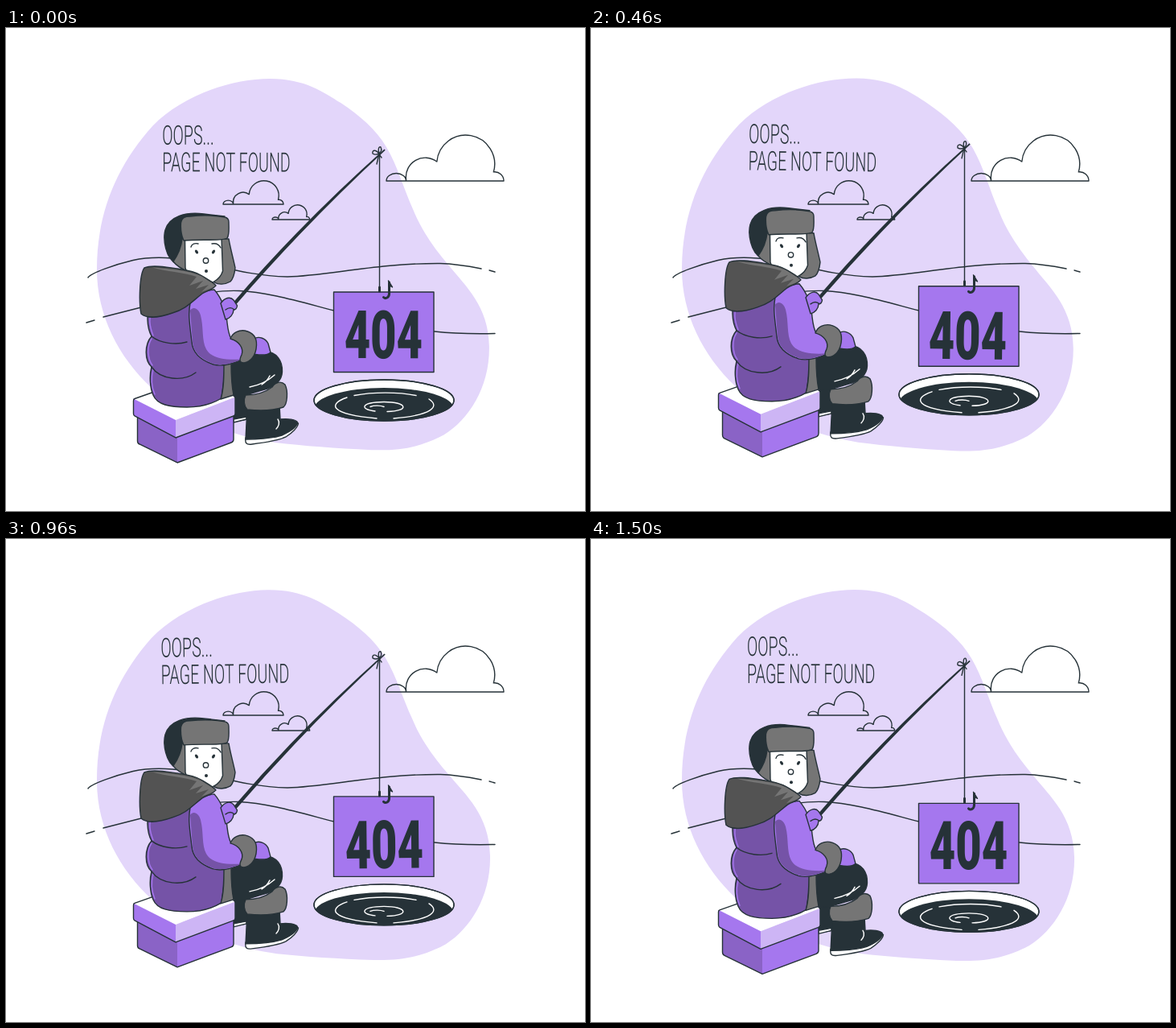
Write an HTML page that moves like this. It is 720 px wide and 600 px high and loops after 1540 ms.

```html
<!DOCTYPE html>
<html lang="en">
<head>
<meta charset="utf-8">
<title>Page not found</title>
<style>
  html, body { margin: 0; width: 100%; height: 100%; overflow: hidden; background: #fff; }
  svg { display: block; width: 720px; height: 600px; }
  svg * { vector-effect: non-scaling-stroke; }
  .line { fill: none; stroke: #263238; stroke-width: 1.4; stroke-linecap: round; stroke-linejoin: round; }
  .white { fill: #fff; }
  .ink { fill: #263238; }
  .lilac { fill: #cdb5f5; }
  .violet { fill: #a577ee; }
  .mid { fill: #8a63c6; }
  .plum { fill: #7553a7; }
  .fur { fill: #757575; }
  .hood { fill: #535353; }
  .plain { stroke: none; }
  .glow { stroke: #fff; }
  .sheen { stroke: #a577ee; }
  .bold { stroke-width: 3; }
  text { font-family: Roboto, "Open Sans", sans-serif; fill: #263238; }
  .title { font-size: 33.3px; font-weight: 300; }
  .code { font-size: 83px; font-weight: 900; text-anchor: middle; }
</style>
</head>
<body>
<svg viewBox="0 0 720 600">
  <defs>
    <path id="cloud" d="M0 0H146C146-7 140-12 133.300-11.100A36 36 0 1 0 62.800-24A24 24 0 0 0 24.500-2V0A12.200 9.500 0 0 0 0 0Z"/>
    <clipPath id="rim"><ellipse cx="470" cy="462.500" rx="87" ry="25.500"/></clipPath>
  </defs>

  <g class="sway">
    <path fill="#e3d6fa" d="M328 63C372 63 395 80 416 93C440 109 460 126 473 148C487 172 494 198 506 225C516 250 532 273 550 294C572 321 600 345 601 395C602 445 576 486 545 505C515 521 490 525 455 524C410 522 370 519 335 515C280 507 215 482 181 447C140 409 113 357 113 300C113 229 138 171 182 122C219 84 280 63 328 63Z"/>
    <g class="title" transform="translate(194 0) scale(.59 1)">
      <text y="145">OOPS...</text>
      <text y="178.500">PAGE NOT FOUND</text>
    </g>
  </g>

  <g class="line">
    <path d="M102 310C106 304 135 294 158 288.500C178 284 205 285 225 288C262 294 300 308 350 309C400 308 460 292 540 292.500C560 293 576 296 591 299M601 301L608 303"/>
    <path d="M100 366L110 363M121 359L172 346C215 335 255 325 290 326.500C325 328 365 340 408 351C450 362 500 374 533 377C560 380 585 380 608 379.500"/>
    <use href="#cloud" transform="translate(473 190)"/>
    <use href="#cloud" transform="translate(270 219) scale(.514)"/>
    <use href="#cloud" transform="translate(331 238) scale(.32)"/>
  </g>

  <g id="scene" class="line">
    <!-- ice hole -->
    <ellipse class="white" cx="470" cy="462.500" rx="87" ry="25.500"/>
    <ellipse class="ink plain" cx="470" cy="473" rx="87" ry="26" clip-path="url(#rim)"/>
    <path class="glow" d="M424 459C400 467 402 480 461 485M433 456.500C456 452 488 452 510 456.500M526 461C540 470 530 481 482 485"/>
    <path class="glow" d="M459 476C440 474 440 465 470 464.500C500 464.500 502 476 474 476.500M453 470.500C458 468.500 466 469 470 470.500"/>
    <ellipse cx="470" cy="462.500" rx="87" ry="25.500"/>

    <!-- far leg -->
    <path class="ink" d="M285 452H300V486L283 489Z"/>
    <path class="white" d="M283 486L299 483V486L283 490Z"/>

    <!-- box: flat faces, then outlines -->
    <g class="plain">
      <path class="mid" d="M163.500 480L213 505V540L166 517Q163.500 516 163.500 513Z"/>
      <path class="violet" d="M213 505L283 478V511Q283 514 280 515L213 540Z"/>
      <path class="white" d="M158.500 461L187 451H270L285 459L211 487Z"/>
      <path class="violet" d="M158.500 460.500L211 487V509L160 482Q158.500 481 158.500 479Z"/>
      <path class="lilac" d="M211 487L285 458.500V479Q285 481 283 482L211 509Z"/>
    </g>
    <path d="M163.500 484V513Q163.500 516 166 517L213 540L280 515Q283 514 283 511V482"/>
    <path d="M187 451L160 460.500Q158.500 461 158.500 463V479Q158.500 481 160 482L211 509L283 482Q285 481 285 479V460Q285 458 283 457"/>

    <!-- near leg -->
    <path class="ink" d="M279 420C290 408 306 402 322 402C337 402 344 414 343.500 427C343 439 334 444 325 448L298 456C292 458 286 456 282 456Z"/>
    <path class="glow" d="M303 446C314 444 325 439 334 431M318 443C323 440 326 436 328 432"/>
    <path class="white" d="M298 509C297 516 299 518 306 517C322 515 340 512 348 508C356 503 363 496 363.500 491Z"/>
    <path class="ink" d="M300 471L340 468L341 486C350 485 361 486 362.500 490C362 496 352 502 343 506C330 510 310 511 298 511Z"/>
    <path class="glow" d="M338 486C341 490 339 495 336 498"/>
    <path class="fur" d="M298 456C295 462 296 470 300 474C317 476 333 475 345 471C350 467 351 451 347 443C342 438 335 440 331 446C322 453 310 456 298 456Z"/>

    <!-- sign and tackle -->
    <path class="violet" d="M407.500 328H532V427.500H407.500Z"/>
    <path d="M464.500 156V322"/>
    <path class="bold" d="M464.500 322V327M469.500 334.500C472 337 476.500 335 476.500 330V316"/>
    <path class="ink" d="M475.500 314L480.500 322L477 320Z"/>
    <path class="ink plain" d="M282.500 341Q367 242.500 470.500 150.500L471.700 151.700Q371 245 286.500 343Z"/>
    <path d="M464 156C459 150 455 152 456 156C459 158 462 157 464 156C462 150 464 147 466 148C468 152 466 154 464 156L461 169M464 157L467 161"/>

    <!-- coat -->
    <path class="plum" d="M180 345C174 352 175 372 181 383C172 393 172 413 181 421C178 432 179 447 183 456C188 468 203 471 225 471C245 471 258 466 268 460L274 415L262 330Z"/>
    <path class="sheen" d="M182 351C177 360 179 372 183 382M181 386C175 395 176 411 182 419M183 424C180 436 182 448 185 455"/>
    <path d="M181 383C192 392 212 394 225 390M181 421C192 437 220 440 236 428"/>
    <path class="fur" d="M271 416H280C280 435 281 446 283 456L267 461C271 448 271 432 271 416Z"/>
    <path class="violet" d="M308 386C315 382 323 386 326 392L329 403C324 408 314 406 308 405Z"/>
    <path class="violet" d="M229 342C233 332 245 326 259 325C270 338 274 352 275 366C276 375 277 381 280 386L294 390V412C280 418 268 421 258 418C240 412 232 402 231 390C229 372 226 356 229 342Z"/>
    <path class="plum plain" d="M229 351C233 345 240 349 242 357C246 372 243 388 249 399C255 410 272 413 293 411.500C280 417 268 420 258 417C241 411 233 402 232 390Z"/>
    <path class="fur" d="M279 386C282 378 290 375 297 376C306 378 312 384 311.500 394C311 407 304 415 296 416C290 416 290 412 293 406C296 398 290 389 279 386Z"/>

    <!-- gripping hand -->
    <path class="violet" d="M267 342C272 335 279 333 283 338L287.500 345C287 349 285 350 283 350C283 356 278 361 273 362Z"/>
    <path d="M273 350C277 347 281 347 284 350"/>

    <!-- head -->
    <path class="ink" d="M212 293C198 286 195 262 198 251C203 234 224 228 246 231L272 234L230 262Z"/>
    <path class="fur" d="M219 262C218 272 213 283 208 290C213 297 222 301 229 304L226 262Z"/>
    <path class="fur" d="M266 262H277C279 274 283 288 285 298C284 307 282 312 279 315C272 319 264 319 259 316Z"/>
    <path class="white" d="M222.500 261L223 298C226 309 234 314 243 317C254 320 266 313 269.500 302L268 261Z"/>
    <path class="fur" d="M217.500 242C219 235 223 234 229 234C245 232 261 233 272 235Q277 236 277 241C277 249 278 257 275 261C270 265 243 262 221 264C218 258 217 250 217.500 242Z"/>
    <path d="M230 272C231 268 235 267 239 268M256 268C261 267 265 269 267 273"/>
    <circle cx="248.500" cy="289" r="3.200"/>
    <g class="ink plain">
      <ellipse cx="237" cy="278" rx="1.700" ry="2.700" transform="rotate(-35 237 278)"/>
      <ellipse cx="258" cy="278" rx="1.700" ry="2.700" transform="rotate(35 258 278)"/>
      <circle cx="249" cy="302" r="2"/>
    </g>

    <!-- hood -->
    <path class="hood" d="M172 298C181 294 200 297 213 299C228 301 238 304 244 308C252 313 258 316 261 320C256 326 250 326 244 330C231 340 224 349 207 354C190 360 175 361 168 355C165 340 166 306 172 298Z"/>
    <path class="fur plain" d="M182 297.500C200 299 228 301 243 308.500C250 313 257 317 260 320C256 324 250 325 243 328L252 319L236 324L245 314L228 320L237 309C220 303 200 303 182 297.500Z"/>
  </g>

  <g class="sway">
    <text class="code" transform="translate(469.500 410) scale(.675 1)">404</text>
  </g>
</svg>
<script>
  const LOOP = 1540, LEAD = 30, LIFT = 12, REST = 0.47;
  const scene = document.getElementById("scene");
  const swaying = document.querySelectorAll(".sway");

  function draw(now) {
    const p = ((now + LEAD) % LOOP) / LOOP;
    const rise = 1 - Math.abs(2 * p - 1);
    const tilt = 1 - 4 * Math.abs((p + 0.25) % 1 - 0.5);
    scene.setAttribute("transform", `translate(0 ${REST - LIFT * rise})`);
    for (const part of swaying) part.setAttribute("transform", `rotate(${tilt} 360 300)`);
  }

  const start = performance.now();
  function tick() {
    draw(performance.now() - start);
    requestAnimationFrame(tick);
  }
  tick();
</script>
</body>
</html>
```
